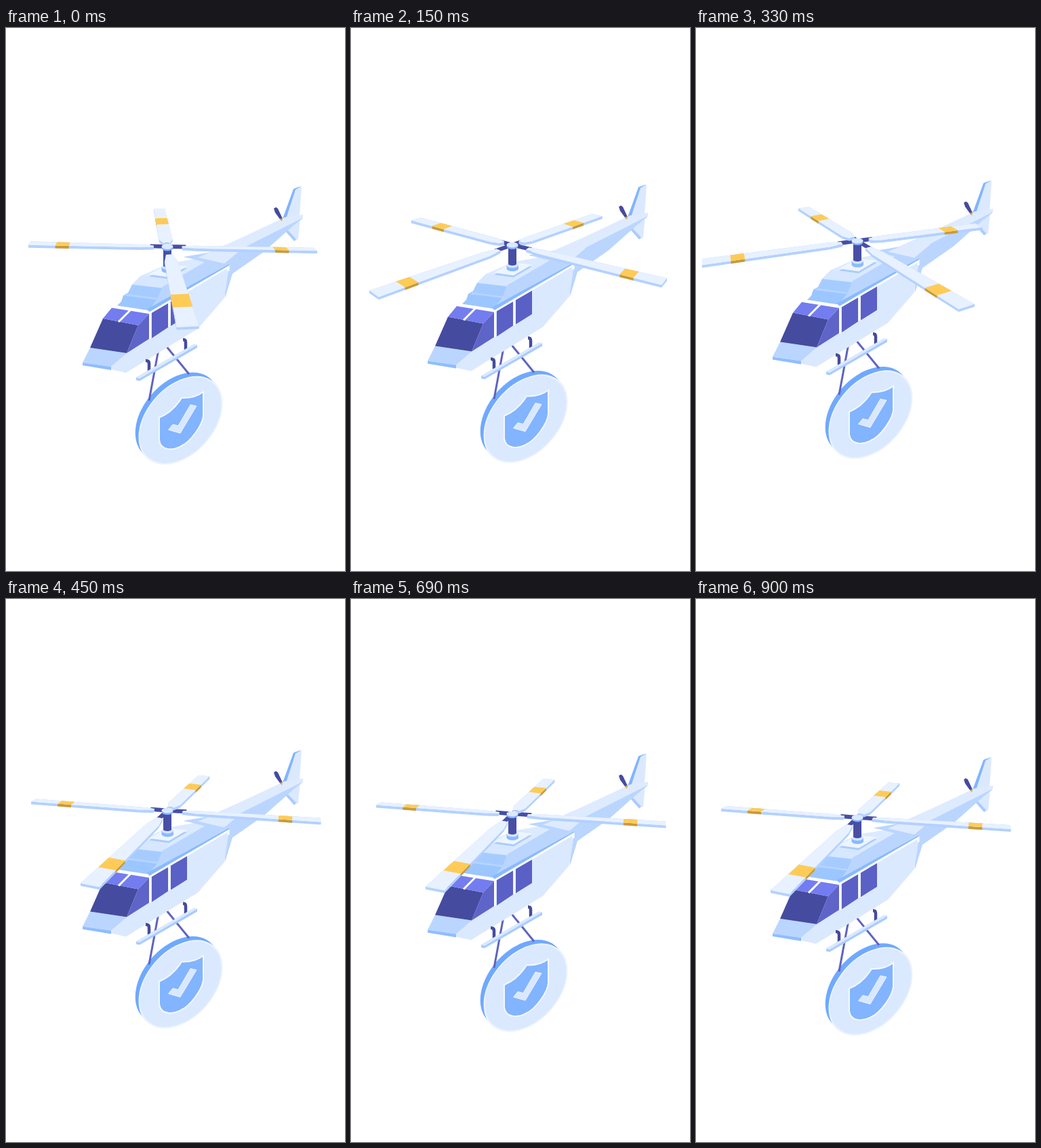
Animation of 500 by 800 pixels, one loop 930 ms. Source, as an HTML page:

```html
<!DOCTYPE html>
<html lang="en">
<head>
<meta charset="utf-8">
<title>Helicopter</title>
<style>
html, body { margin: 0; width: 100%; height: 100%; overflow: hidden; background: #fff; }
svg { display: block; width: 100%; height: 100%; }
</style>
</head>
<body>
<svg viewBox="0 0 500 800">
  <g id="craft">
    <!-- coin -->
    <g transform="matrix(1 -.4 0 .97 257.5 578)" fill="#6fa9ff">
      <circle r="61.5" cx="-5.3" cy="-8.4"/>
      <circle r="61.5" cx="-2.7" cy="-4.2"/>
      <circle r="61" fill="#dbe9ff" stroke="#ebf3ff" stroke-width="2"/>
    </g>
    <path d="M226 574Q246 566 259 545Q278 546 291 536V571C290 585 272 610 258 616C248 622 228 624 226 607Z" fill="#82b4ff" stroke="#f3f8ff" stroke-width="2"/>
    <path d="M239.5 592L246 584L254 586L272 555L281 557L257 597Z" fill="#d9e8ff" stroke="#eaf3ff"/>
    <path d="M226 468L211 549M234 466L270 510" fill="none" stroke="#5f64c0" stroke-width="3"/>

    <!-- tail -->
    <path d="M410 297L420 284L434 279L431 311L425 314Z" fill="#dbe9ff"/>
    <path d="M409 296L412 294L428 311L425 314Z" fill="#a9ccff"/>
    <path d="M424 237L435 233L427 240L415 278L408 281Z" fill="#82b4ff"/>
    <path d="M427 238L436 233L433 277L413 281Z" fill="#dbe9ff"/>
    <path d="M438 275L437 281L424 291L380 330L334 362L323 398L320 340Z" fill="#bad6ff"/>
    <path d="M438 275L411 279L345 310L300 330L262 338L322 346L340 329L437 280Z" fill="#deebff"/>
    <path d="M395 266L398 264L401 266L408 281L405 283L397 272Z" fill="#454b9f"/>
    <path d="M404 281L408 280L407 285Z" fill="#e0a83a"/>

    <!-- hull -->
    <path d="M155 499L178 478L212 421L329 352L322 398L283 443L177 508L155 503Z" fill="#dbe9ff"/>
    <path d="M124 471L178 479L155 499L113 493Z" fill="#bad6ff"/>
    <path d="M113 493L155 499L155 504L113 497Z" fill="#8fbdff"/>

    <!-- roof -->
    <path d="M199 365L240 347L292 338L296 346L231 383L186 378Z" fill="#dceaff"/>
    <path d="M199 365L241 371L230 383L186 378Z" fill="#d6e7ff"/>
    <path d="M210 415L231 381L293 345L262 337L300 331L329 350Z" fill="#bad6ff"/>
    <path d="M283 338L300 331L345 312L345 328L322 347Z" fill="#deebff"/>
    <path d="M186 378L230 383L222 402L173 394L180 390Z" fill="#a6ccff"/>
    <path d="M173 394L222 401L210 416L164 409L170 403Z" fill="#9cc6ff"/>
    <path d="M178 393L223 399" stroke="#bad6ff" stroke-width="2"/>
    <path d="M208 414L329 348L329 353L213 420Z" fill="#8abaff"/>
    <path d="M211 366L238 351L267 354L240 370Z" fill="#a9ccff"/>
    <path d="M211 363L238 348L267 351L240 367Z" fill="#eef5ff"/>

    <!-- cabin -->
    <path d="M143 428L195 438L178 479L124 471Z" fill="#454b9f"/>
    <path d="M143 428L157 411L212 420L195 438Z" fill="#737def"/>
    <path d="M195 438L212 420L211 458L178 479Z" fill="#5f64c8"/>
    <path d="M215 419L239 405L239 441L215 457ZM243 403L267 388V424L243 439Z" fill="#5a60c5"/>
    <path d="M156 410.7L212 419.7L328 352V358M183 416L166 433M212.5 420V458M241 405V440" fill="none" stroke="#fff" stroke-width="3"/>

    <!-- skid -->
    <path d="M206 490Q211 490 211 494V505M261 459Q265 459 265 463V474" fill="none" stroke="#454b9f" stroke-width="4.5"/>
    <path d="M192 515L277 466L282 467V471L197 520L192 519Z" fill="#a9ccff"/>
    <path d="M192 515L277 466L282 467L197 516.5Z" fill="#dbe9ff"/>

    <!-- mast -->
    <path d="M229.5 352V357A8.7 4 0 0 0 247 357V352Z" fill="#8abaff"/>
    <ellipse cx="238.2" cy="352" rx="8.7" ry="4" fill="#d3e5ff"/>
    <path d="M232 324H244V350A6 2.5 0 0 1 232 350Z" fill="#484ea4"/>
    <g transform="translate(238 322)">
      <g id="rotor"></g>
      <ellipse cy="2" rx="8.5" ry="4.5" fill="#82b4ff"/>
      <ellipse rx="8.5" ry="4" fill="#dbe9ff"/>
    </g>
  </g>
</svg>
<script>
const STEP = 30, COUNT = 31, LIFT = 5.25, EDGE = 4;
const craft = document.getElementById("craft");
const rotor = document.getElementById("rotor");

// Key points on the path of a blade tip around the hub, a sixteenth of a turn apart.
const path = [
  [218, 4], [179, -23], [125, -44], [54, -51], [-12, -56], [-79, -49], [-142, -38], [-197, -15],
  [-203, -5], [-229, 31], [-204, 72], [-114, 110], [30, 118], [161, 97], [224, 54], [226, 14]
];

const tip = k => path[(k + 16) % 16];
const mix = (p, q, t) => p.map((v, i) => v + (q[i] - v) * t);
const poly = (pts, fill) =>
  `<polygon points="${pts.map(p => p.map(v => v.toFixed(1))).join(" ")}" fill="${fill}"/>`;
const drop = ([x, y]) => [x, y + EDGE];
const wall = (p, q, fill) => poly([p, q, drop(q), drop(p)], fill);

// A blade is as wide as its tip moves in a fixed part of a turn.
const chord = k => tip(k + 1).map((v, i) => (v - tip(k - 1)[i]) * 0.12);

function blade(k) {
  const end = tip(k), outer = chord(k);
  const inner = mix(outer, chord(k + 8).map(v => -v), 0.5);
  const at = (t, [x, y], w) => [end[0] * t + x * w, end[1] * t + y * w];
  const rails = [0.5, -0.5].map(s => [at(0.19, inner, s * 0.8), at(1, outer, s)]);
  const neck = [0.2, -0.2].map(s => at(0.1, inner, s));
  const [a, b] = rails;
  const shape = [neck[0], ...a, b[1], b[0], neck[1]];

  // The stripe seems nearer the hub and longer where the blade is foreshortened.
  const side = Math.abs(end[0]) / 225;
  const mid = 0.66 + 0.11 * side, half = 0.085 - 0.04 * side;
  const cuts = rails.map(([p, q]) => [mid - half, mid + half].map(t => mix(p, q, (t - 0.19) / 0.81)));

  return shape.map((p, i) => wall(p, shape[(i + 1) % shape.length], "#b3d1ff")).join("") +
    cuts.map(([p, q]) => wall(p, q, "#c99b38")).join("") +
    poly(shape, "#e8f1ff") +
    poly([...cuts[0], cuts[1][1], cuts[1][0]], "#ffcb57");
}

function drawRotor(turn) {
  const ids = [0, 4, 8, 12].map(k => k + turn).sort((i, j) => tip(i)[1] - tip(j)[1]);
  const arms = ids.map(k => "M0 0L" + tip(k).map(v => v * 0.125).join(" ")).join("");
  rotor.innerHTML = `<path d="${arms}" stroke="#484ea4" stroke-width="6"/>` + ids.map(blade).join("");
}

function draw(ms) {
  const n = Math.floor(ms / STEP) % COUNT;
  const y = -LIFT * (1 - Math.cos(2 * Math.PI * n / COUNT));
  craft.setAttribute("transform", `translate(0 ${y.toFixed(2)})`);
  drawRotor(Math.floor(n / 2) % 4);
}

let start;
function tick(now) {
  start ??= now;
  draw(now - start);
  requestAnimationFrame(tick);
}
draw(0);
requestAnimationFrame(tick);
</script>
</body>
</html>
```
